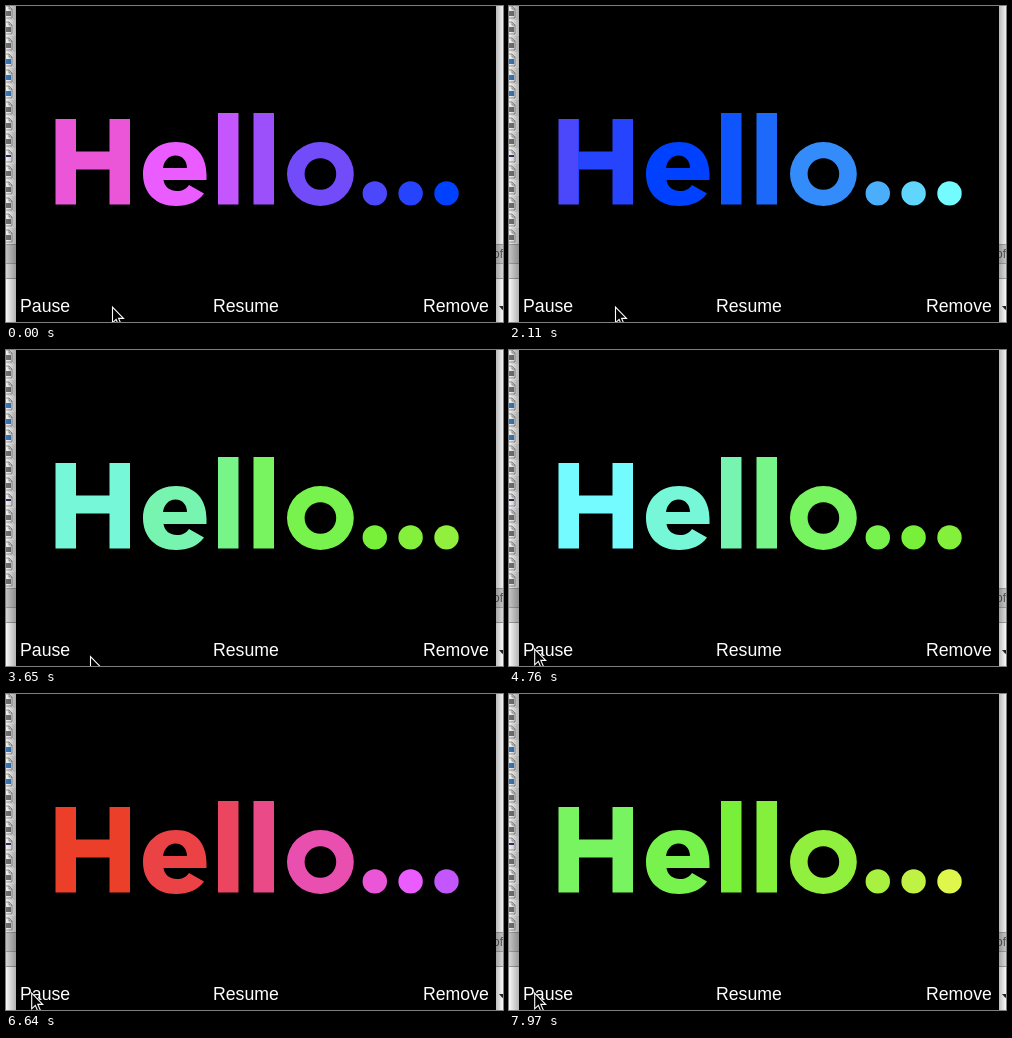
Animation of 497 by 316 pixels, one loop 8 s. Source, as an HTML page:

```html
<!DOCTYPE html>
<html lang="en">
<head>
<meta charset="utf-8">
<title>Hello</title>
<style>
  html, body { margin: 0; width: 100%; height: 100%; overflow: hidden; background: #000; }
  svg { display: block; width: 100%; height: 100%; }
  text { font-family: "Liberation Sans", Arial, sans-serif; }
  .label { font-size: 17.7px; fill: #fff; }
</style>
</head>
<body>
<svg viewBox="0 0 497 316">
  <defs>
    <linearGradient id="shadeL"><stop offset="0" stop-opacity=".03"/><stop offset="1" stop-opacity=".3"/></linearGradient>
    <linearGradient id="shadeR"><stop offset="0" stop-opacity=".25"/><stop offset="1" stop-opacity=".02"/></linearGradient>
    <g id="doc">
      <path d="M-3 -6H3L6 -3V6H-3Z" fill="#fafafa" stroke="#8a8a8a" stroke-width=".8"/>
      <path d="M3 -6V-3H6" fill="none" stroke="#8a8a8a" stroke-width=".8"/>
    </g>
    <g id="fills"></g>
  </defs>

  <rect width="497" height="316" fill="#fff"/>
  <rect width="10" height="238" fill="#f1f1f1"/>
  <g id="files"></g>
  <rect y="238" width="497" height="20" fill="#c9c9c9"/>
  <rect y="258" width="497" height="14" fill="#dedede"/>
  <path d="M0 238.5H497M0 257.5H497M0 272.5H497" stroke="#a2a2a2"/>
  <rect x="490" width="7" height="238" fill="#f7f7f7"/>
  <text x="487" y="252" font-size="12" fill="#555">of</text>
  <path d="M493 300H500L496.5 304Z" fill="#222"/>
  <rect width="10" height="316" fill="url(#shadeL)"/>
  <rect x="490" width="7" height="316" fill="url(#shadeR)"/>

  <rect x="10" width="480" height="316" fill="#000"/>
  <g id="word" role="img" aria-label="Hello..." fill-rule="evenodd"></g>
  <text class="label" x="14" y="306">Pause</text>
  <text class="label" x="207" y="306">Resume</text>
  <text class="label" x="417" y="306">Remove</text>
  <path id="cursor" d="M0 0V15.8L3.6 12.4L6.1 18.2L8.6 17.1L6.1 11.4H11Z" fill="#000" stroke="#fff" stroke-width="1.1"/>
</svg>
<script>
const NS = 'http://www.w3.org/2000/svg';
const $ = id => document.getElementById(id);
function add(parent, tag, attrs) {
  const el = document.createElementNS(NS, tag);
  for (const k in attrs) el.setAttribute(k, attrs[k]);
  return parent.appendChild(el);
}

const LOOP = 8000, LEFT = 10, WIDTH = 480, FRAME = 27.8;

// Hue wheel, one colour per 20 degrees
const WHEEL = ('eb3f2a ed6a2d f3b03c fdfb54 c0f245 90f03d 78f03a 78f460 77f5b0 ' +
  '74fbff 4baefa 1c69fa 0040ff 4b47fa 9b50fa ea5cff e94fae eb4560')
  .split(' ').map(h => [0, 2, 4].map(i => parseInt(h.substr(i, 2), 16)));

// [time, hue steps made so far]; the fraction is how far the screen has been redrawn
const PHASE = [[0, 0], [970, 62.896], [2110, 138.123], [3650, 238], [4760, 311], [6640, 437], [7970, 523], [8000, 525]];

// [time, x, y]
const PATH = [[0, 106.5, 301], [3130, 106.5, 301], [3350, 102, 305], [3650, 84.5, 306.5],
  [3850, 55, 303], [4060, 25.7, 299], [8000, 25.7, 299]];

const ellipse = (x, y, rx, ry) =>
  `M${x - rx} ${y}a${rx} ${ry} 0 1 1 ${2 * rx} 0a${rx} ${ry} 0 1 1 ${-2 * rx} 0Z`;
const bar = x => `M${x} 107H${x + 20.5}V198.5H${x}Z`;
const GLYPHS = [
  'M49.5 113H70V145.5H103.5V113H124V198.5H103.5V163.5H70V198.5H49.5Z',
  'M200.5 174H157.5C158.5 181 164 185 171 185C176.5 185 180 183 183 179L198 187.5' +
    'C192 196 182 200 170 200C150 200 137 187 137 168C137 149 151 136 170 136C189 136 200.5 149 200.5 169Z' +
    'M181 162C181 155 176.5 149.5 169.5 149.5C162.5 149.5 158 155 157 162Z',
  bar(212), bar(247.5),
  ellipse(314.4, 168, 33.4, 32) + ellipse(314.4, 168, 15.8, 15.8),
  ...[368.8, 404.6, 440.5].map(x => ellipse(x, 187.4, 12.2, 12.2))
];

const fills = GLYPHS.map((d, i) => {
  const grad = add($('fills'), 'linearGradient', {
    id: 'fill' + i, gradientUnits: 'userSpaceOnUse', x1: LEFT, x2: LEFT + WIDTH, y1: 0, y2: 0
  });
  add($('word'), 'path', { d, fill: `url(#fill${i})` });
  return [add(grad, 'stop', {}), add(grad, 'stop', {})];
});

for (let i = 0; i < 15; i++) {
  const y = 6 + i * 16;
  if (i % 2) add($('files'), 'rect', { y: y - 8, width: 10, height: 16, fill: '#fff' });
  add($('files'), 'use', { href: '#doc', y });
  const blue = i === 3 || i === 4 || i === 5;
  add($('files'), 'rect', {
    x: 0, y: y - 1, width: 5, height: i === 9 ? 2 : 5, fill: blue ? '#3b7fc4' : i === 9 ? '#343464' : '#777'
  });
}

function segment(keys, t) {
  let i = 0;
  while (i < keys.length - 2 && t >= keys[i + 1][0]) i++;
  const [a, b] = [keys[i], keys[i + 1]];
  return [a, b, (t - a[0]) / (b[0] - a[0])];
}

const mix = (a, b, k) => a + (b - a) * k;

// Holds each value for one frame
function held(keys, t) {
  const [a, b, k] = segment(keys, t);
  const n = Math.max(1, Math.round((b[0] - a[0]) / FRAME));
  const step = Math.floor(k * n + 1e-6) / n;
  return a.slice(1).map((v, i) => mix(v, b[i + 1], step));
}

function color(hue) {
  const h = (hue % 360 + 360) % 360 / 20;
  const i = Math.floor(h), a = WHEEL[i], b = WHEEL[(i + 1) % WHEEL.length];
  return `rgb(${a.map((v, c) => Math.round(mix(v, b[c], h - i)))})`;
}

function draw(t) {
  const phase = held(PHASE, t)[0] + 1e-6;
  const tick = Math.floor(phase), tear = phase - tick;
  fills.forEach((stops, i) => {
    const hue = 310 + 10 * (tick - i);
    stops.forEach((stop, s) => {
      stop.setAttribute('offset', tear);
      stop.setAttribute('stop-color', color(s ? hue : hue + 10));
    });
  });
  const [x, y] = held(PATH, t);
  $('cursor').setAttribute('transform', `translate(${x} ${y})`);
}

const start = performance.now();
function loop() {
  draw((performance.now() - start) % LOOP);
  requestAnimationFrame(loop);
}
draw(0);
requestAnimationFrame(loop);
</script>
</body>
</html>
```
